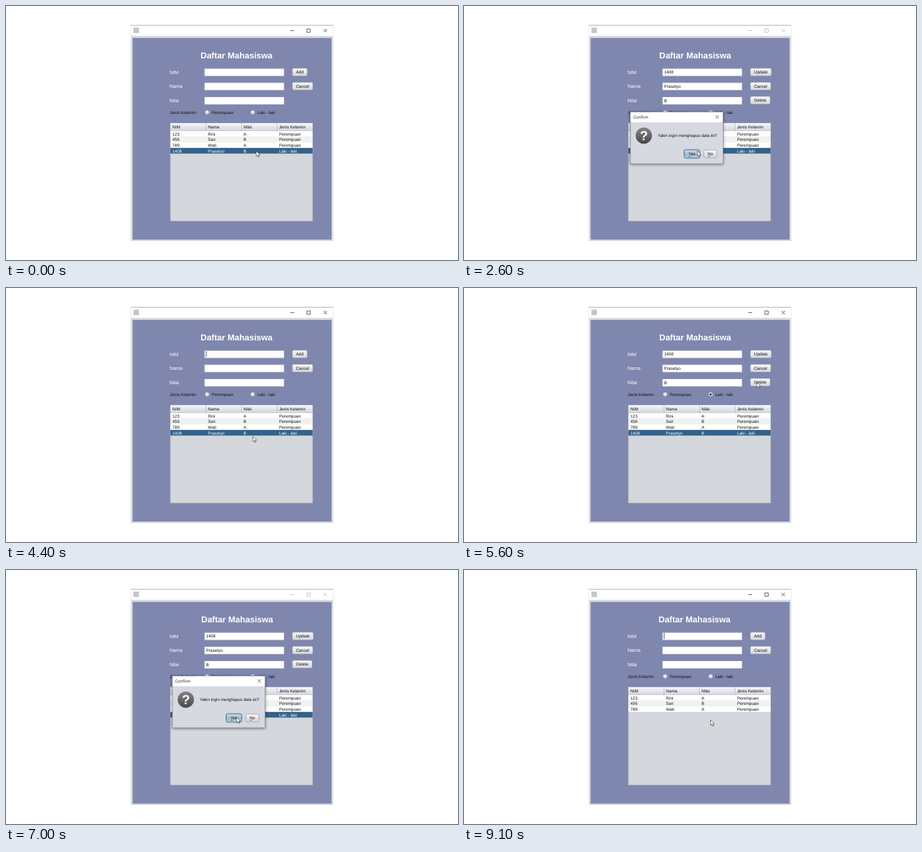
Recreate the animation shown at these times as an HTML page. Size 690 by 388 pixels, loop 9400 ms.

```html
<!DOCTYPE html>
<html lang="id">
<head>
<meta charset="utf-8">
<title>Daftar Mahasiswa</title>
<style>
  html, body { margin: 0; width: 100%; height: 100%; overflow: hidden; background: #fff; }
  svg { display: block; width: 690px; height: 388px; }
  text { font: 6.45px "Liberation Sans", Arial, sans-serif; fill: #111; text-rendering: geometricPrecision; white-space: pre; }
  text.heading { font-size: 13px; font-weight: bold; fill: #fff; }
  text.label { font-size: 7.35px; fill: #fff; }
  text.caption { font: 6.2px "Open Sans", "Noto Sans", sans-serif; }
  text.light { fill: #fff; }
  .line { fill: none; stroke-width: .8; }
  #dialog { transform-origin: 324.7px 201.5px; }
  #frame { filter: drop-shadow(.5px 1.5px 2px #0007); }
</style>
</head>
<body>
<svg id="stage" viewBox="0 0 690 388">
  <defs>
    <linearGradient id="face" x2="0" y2="1">
      <stop stop-color="#f7f8fa"/><stop offset=".5" stop-color="#e3e5ea"/><stop offset="1" stop-color="#d2d5dc"/>
    </linearGradient>
    <linearGradient id="blueFace" x2="0" y2="1">
      <stop stop-color="#d5e2ec"/><stop offset=".5" stop-color="#a3bace"/><stop offset="1" stop-color="#b9d0e0"/>
    </linearGradient>
    <linearGradient id="grayBall" x2="0" y2="1">
      <stop stop-color="#858585"/><stop offset="1" stop-color="#484848"/>
    </linearGradient>
    <linearGradient id="blueBall" x2="0" y2="1">
      <stop stop-color="#5c8ade"/><stop offset="1" stop-color="#1b46a4"/>
    </linearGradient>
  </defs>
</svg>
<script>
const LOOP = 9400, STEP = 100;
const stage = document.getElementById('stage');
const $ = id => document.getElementById(id);

const rect = (x, y, w, h, fill, more = '') =>
  `<rect x="${x}" y="${y}" width="${w}" height="${h}" fill="${fill}" ${more}/>`;
const text = (x, y, s, cls = '', more = '') => `<text x="${x}" y="${y}" class="${cls}" ${more}>${s}</text>`;
const group = (id, ...parts) => `<g id="${id}">${parts.join('')}</g>`;
const path = (d, stroke, more = '') => `<path class="line" d="${d}" stroke="${stroke}" ${more}/>`;

const button = (x, y, w, s, blue) =>
  (blue ? rect(x - .8, y - .8, w + 1.6, 13.6, 'none', 'rx="3" stroke="#729fc2" stroke-width="1"') : '') +
  rect(x, y, w, 12, `url(#${blue ? 'blueFace' : 'face'})`, `rx="2.3" stroke="${blue ? '#48647e' : '#8d919c'}" stroke-width=".7"`) +
  text(x + w / 2, y + 8.4, s, '', 'text-anchor="middle"');

const field = y =>
  rect(303, y, 121.5, 12, '#fff', 'stroke="#a5aabd" stroke-width=".8"') +
  path(`M303 ${y + .2}h121.5`, '#73798f');

const radio = (x, label) =>
  `<circle cx="${x}" cy="162.5" r="3.2" fill="url(#face)" stroke="#868b98" stroke-width=".6"/>` +
  text(x + 7, 165, label);

const tableRow = (cells, i) => {
  const y = 191 + i * 8.6, picked = i === 3;
  const fill = picked ? '#336288' : i % 2 ? '#f1f2f0' : '#fff';
  return rect(251, y, 217, 8.6, fill) +
    cells.map((c, k) => text(254 + k * 54.3, y + 6.7, c, picked ? 'light' : '')).join('');
};

const rows = [
  ['123', 'Rini', 'A', 'Perempuan'],
  ['456', 'Sari', 'B', 'Perempuan'],
  ['789', 'Wati', 'A', 'Perempuan'],
  ['1408', 'Prasetyo', 'B', 'Laki - laki']
];
const heads = ['NIM', 'Nama', 'Nilai', 'Jenis Kelamin'];

const ball = (fill, sign) =>
  `<circle cx="274.5" cy="198" r="12.3" fill="url(#${fill})" stroke="#0003" stroke-width=".6"/>` +
  text(274.5, 205, sign, 'light', 'text-anchor="middle" style="font-size:20px;font-weight:bold"');

stage.innerHTML += [
  // main window
  rect(190.5, 29, 309, 330, '#d7dae0'),
  rect(191, 29.8, 308, 15.8, '#fff'),
  path('M190.5 29.4h309', '#aaa'),
  rect(194.5, 33, 8.4, 8.4, '#c3c7cd'),
  group('controls', path('M434 37.6h6M459.2 35h5.2v5.2h-5.2zM485 35l5 5M490 35l-5 5', 'currentColor')),
  rect(193.3, 48.8, 303.7, 308, '#7f87af'),
  text(297, 79.6, 'Daftar Mahasiswa', 'heading', 'id="heading"'),
  ['NIM', 'Nama', 'Nilai'].map((s, i) => text(249.7, 103.6 + i * 21.6, s, 'label') + field(95 + i * 21.7)).join(''),
  text(250, 165, 'Jenis Kelamin'),
  radio(307, 'Perempuan'),
  radio(376.5, 'Laki - laki'),
  button(437, 116.5, 31.5, 'Cancel'),
  group('addMode', button(437, 95, 23, 'Add')),
  group('editMode', button(437, 95, 32.3, 'Update'), button(437, 138, 30.5, 'Delete')),
  group('values',
    ['1408', 'Prasetyo', 'B'].map((s, i) => text(305.4, 103.4 + i * 21.6, s)).join(''),
    '<circle cx="376.5" cy="162.5" r="1.6" fill="#222"/>'),
  group('caret', path('M305.5 96.5v9', '#333')),
  // table
  rect(251, 179, 217, 149.3, '#d4d7dc', 'stroke="#b4b8c2" stroke-width=".8"'),
  rect(251, 179, 217, 12, 'url(#face)'),
  path('M251 191h217M305.3 179v12M359.5 179v12M413.8 179v12', '#b3b6bf'),
  heads.map((s, k) => text(254 + k * 54.3, 187, s)).join(''),
  rows.slice(0, 3).map(tableRow).join(''),
  group('lastRow', tableRow(rows[3], 3)),
  // dialog
  group('dialog',
    `<g id="frame">${rect(254, 162, 141.4, 79, '#d6d9df', 'stroke="#858994" stroke-width=".8"')}</g>`,
    rect(254.4, 162.4, 140.6, 15.2, '#fff'),
    path('M384 167l5 5M389 167l-5 5', '#444'),
    group('confirm',
      text(258.2, 172.2, 'Confirm', 'caption'),
      ball('grayBall', '?'),
      text(295.7, 200.3, 'Yakin ingin menghapus data ini?', '', 'style="font-size:6.3px"'),
      button(336.5, 220, 23, 'Yes', true),
      path('M342.5 229.6h4', '#222', 'style="stroke-width:.5"'),
      button(366, 220, 20, 'No'),
      path('M372 229.6h4', '#222', 'style="stroke-width:.5"')),
    group('message',
      text(258.2, 172.2, 'Message', 'caption'),
      ball('blueBall', 'i'),
      text(296.2, 200.3, '', '', 'id="notice"'),
      button(364.5, 220.3, 22, 'OK', true))),
  '<path id="cursor" d="M0 0v8.2l1.9-1.7 1.4 3.1 1.3-.6-1.4-3h2.6z" fill="#fff" stroke="#222" stroke-width=".6"/>'
].join('');

// time, x, y of the pointer tip
const route = [
  [0, 382, 221.5], [900, 382, 221.5], [1300, 444, 146], [2000, 444, 146],
  [2400, 340, 207], [2700, 362, 226], [2900, 362, 226], [3300, 377, 226.5],
  [4700, 377, 226.5], [4800, 378, 222], [4900, 378, 222], [5200, 447, 144],
  [6500, 447, 144], [7000, 352, 225], [7300, 352, 225], [7400, 355.5, 225],
  [8100, 355.5, 225], [8400, 376.5, 229], [LOOP, 376.5, 229]
];

// open, close, kind, notice
const dialogs = [
  [1770, 3500, 'confirm'],
  [3565, 4400, 'message', 'Data Gagal Dihapus'],
  [6000, 7400, 'confirm'],
  [7390, 8700, 'message', 'Data Berhasil Dihapus']
];

const show = (id, on) => { $(id).style.display = on ? '' : 'none'; };

function pointer(t) {
  const i = route.findIndex(p => p[0] > t);
  const [t0, x0, y0] = route[i - 1], [t1, x1, y1] = route[i];
  const p = (t - t0) / (t1 - t0), k = p * p * (3 - 2 * p);
  return [x0 + (x1 - x0) * k, y0 + (y1 - y0) * k];
}

function draw(now) {
  const t = Math.floor(now % LOOP / STEP) * STEP;
  const within = (a, b) => t >= a && t < b;
  const editing = within(600, 4400) || within(4800, 8700);
  const inactive = within(1770, 4400) || within(6000, 8700);

  $('heading').setAttribute('x', editing ? 298 : 297);
  $('controls').style.color = inactive ? '#b5b5b5' : '#333';
  show('addMode', !editing);
  show('editMode', editing);
  show('values', within(600, 3500) || within(4800, 7400));
  show('caret', within(4400, 4800) || t >= 8700);
  show('lastRow', t < 7400);

  const open = dialogs.findLast(d => within(d[0], d[1]));
  show('dialog', open);
  if (open) {
    const [start, , kind, notice = ''] = open;
    const p = Math.min(1, (t - start) / 300);
    show('confirm', kind === 'confirm');
    show('message', kind === 'message');
    $('notice').textContent = notice;
    $('dialog').style.opacity = p;
    $('dialog').style.transform = `scale(${1 - .05 * (1 - p) ** 3})`;
  }
  $('cursor').setAttribute('transform', `translate(${pointer(t)})`);
}

const begin = performance.now();
(function tick() {
  draw(performance.now() - begin);
  requestAnimationFrame(tick);
})();
</script>
</body>
</html>
```
